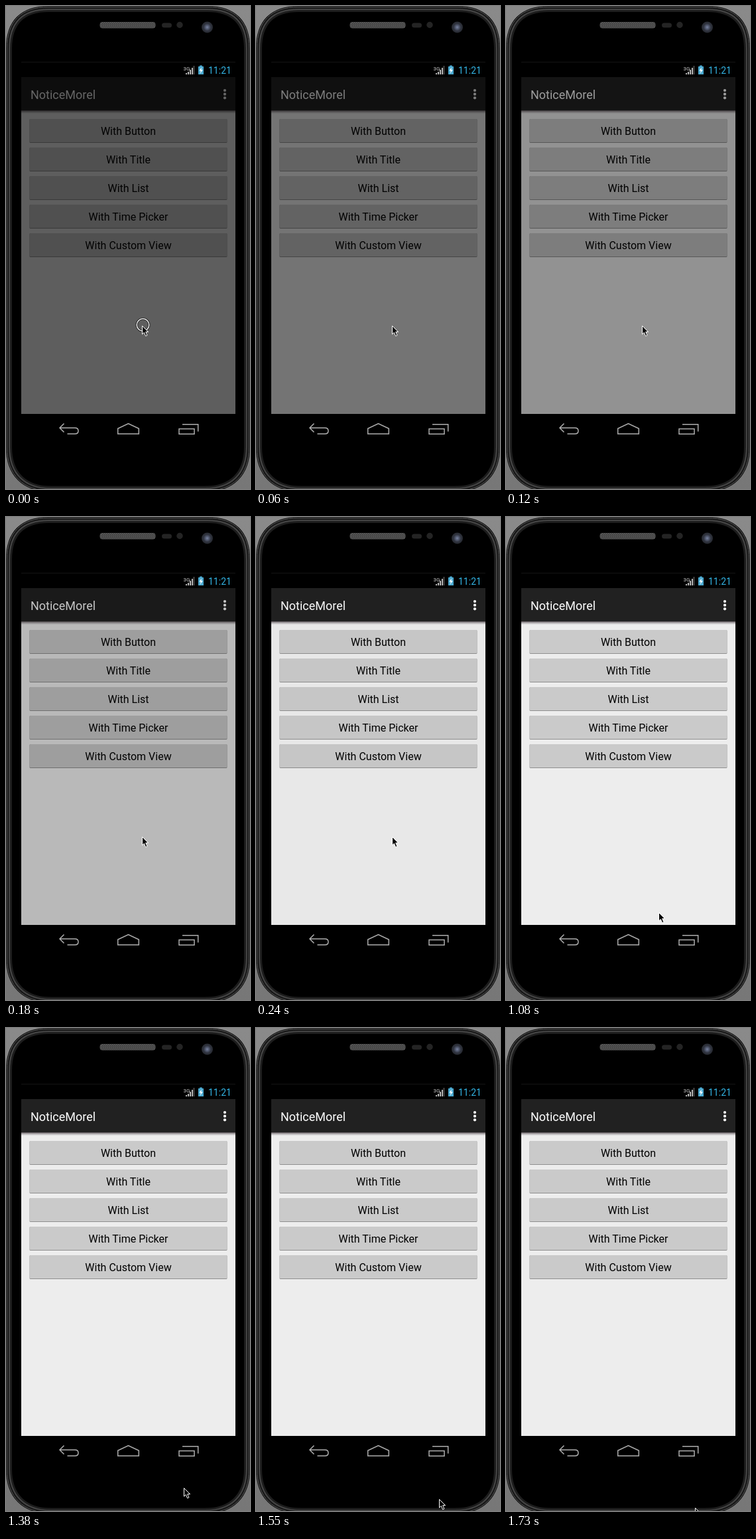
These frames come from a looping animation (368x727 px, 1.79 s). An HTML page:

```html
<!DOCTYPE html>
<html lang="en">
<head>
<meta charset="utf-8">
<title>Phone dialog fade</title>
<style>
html, body { margin: 0; width: 100%; height: 100%; overflow: hidden; background: #838383; }
svg { display: block; width: 368px; height: 727px; font-family: Roboto, sans-serif; }
</style>
</head>
<body>
<svg viewBox="0 0 368 727">
  <defs>
    <linearGradient id="back" x2="0" y2="1">
      <stop offset="0" stop-color="#8a8a8a"/><stop offset="1" stop-color="#777"/>
    </linearGradient>
    <linearGradient id="shade" x2="0" y2="1">
      <stop offset="0" stop-color="#514a4e"/><stop offset=".4" stop-color="#aaa5a8"/><stop offset="1" stop-color="#ededed"/>
    </linearGradient>
    <radialGradient id="lens">
      <stop offset="0" stop-color="#7883a0"/><stop offset=".4" stop-color="#4a5165"/>
      <stop offset=".65" stop-color="#30343f"/><stop offset="1" stop-color="#272a31"/>
    </radialGradient>
    <pattern id="mesh" width="3" height="3" patternUnits="userSpaceOnUse">
      <rect width="3" height="3" fill="#383838"/><path d="M0 0L3 3M3 0L0 3" stroke="#686868" stroke-width=".7"/>
    </pattern>
    <path id="body" d="M1.5 64C1.5 23 23 1.5 64 1.5H304C345 1.5 366.5 23 366.5 64V664C366.5 706 342 730 300 730H68C26 730 1.5 706 1.5 664Z"/>
    <clipPath id="inside"><use href="#body"/></clipPath>
  </defs>

  <rect width="368" height="727" fill="url(#back)"/>
  <use href="#body"/>
  <g fill="none" clip-path="url(#inside)">
    <use href="#body" stroke="#1d1d1d" stroke-width="15"/>
    <use href="#body" stroke="#4c4c4c" stroke-width="9"/>
    <use href="#body" stroke="#222" stroke-width="6"/>
  </g>
  <use href="#body" fill="none" stroke="#0b0b0b" stroke-width="3"/>
  <use href="#body" fill="none" stroke="#646464" stroke-width="1"/>

  <rect x="142" y="24.5" width="83" height="8.5" rx="3" fill="url(#mesh)" stroke="#555"/>
  <rect x="235" y="25.5" width="15" height="7" rx="3.5" fill="#242424"/>
  <circle cx="262" cy="28.5" r="4.7" fill="#242424"/>
  <circle cx="303.5" cy="32" r="8.5" fill="url(#lens)"/>

  <path d="M23 84.5H346" stroke="#141414"/>
  <text x="267.5" y="96.5" font-size="8" fill="#ccc">3G</text>
  <path d="M271 103V101H273V103ZM274 103V99H276V103ZM277 103V96H279V103ZM280 103V93H282V103Z" fill="#bbb"/>
  <path d="M283 103V90H284V103Z" fill="#777"/>
  <path d="M290 91H292V89.5H296V91H298V103H290Z" fill="#4aa9d0"/>
  <path d="M295 92L291.5 97.5H293.7L293 102L296.7 96H294.5Z" fill="#fff"/>
  <text x="305" y="101.5" font-size="14" fill="#33b5e5">11:21</text>

  <rect x="23" y="107" width="323" height="507" fill="#ededed"/>
  <rect x="23" y="107" width="323" height="50" fill="#212121"/>
  <rect x="23" y="157" width="323" height="5" fill="url(#shade)"/>
  <text x="37" y="139.5" font-size="18" fill="#fff">NoticeMorel</text>
  <g fill="#fff">
    <circle cx="330" cy="127" r="2.1"/><circle cx="330" cy="132.7" r="2.1"/><circle cx="330" cy="138.3" r="2.1"/>
  </g>
  <g id="buttons" font-size="16" text-anchor="middle"></g>
  <rect id="dim" x="23" y="107" width="323" height="507"/>

  <g fill="none" stroke="#adadad" stroke-width="1.5">
    <path d="M87.5 628.5L81 635L87.5 641.5M81 635H104Q109 635 109 639.5T104 644H92.5"/>
    <path d="M168.7 644V636L184.5 628.5L200.3 636V644Z"/>
    <path d="M261 636.5H284V644.3H261ZM266 629.7H289.7V640.5"/>
  </g>

  <g id="ring" fill="none">
    <circle cx="206.5" cy="480" r="9.3" stroke="#222" stroke-width="3"/>
    <circle cx="206.5" cy="480" r="9.3" stroke="#fff" stroke-width="1.3"/>
  </g>
  <path id="cursor" d="M.5 .5V13L3.3 10.4L5.6 15.7L7.9 14.7L5.7 9.6H9.6Z" stroke="#fff" stroke-width="1"/>
</svg>
<script>
const LOOP = 1790;
const $ = id => document.getElementById(id);

$("buttons").innerHTML = ["Button", "Title", "List", "Time Picker", "Custom View"].map((name, i) =>
  `<g transform="translate(0 ${i * 43})">
    <rect x="35.5" y="170" width="298" height="36" rx="1.5" fill="#8f8f8f"/>
    <rect x="35.5" y="170" width="298" height="35" rx="1.5" fill="#cacaca"/>
    <text x="184.5" y="194">With ${name}</text>
  </g>`).join("");

// Each step is [time, value] and holds until the next one.
function play(id, prop, steps) {
  const frames = steps.map(([time, value]) => ({ offset: time / LOOP, [prop]: value, easing: "step-end" }));
  frames.push({ offset: 1, [prop]: steps[steps.length - 1][1] });
  $(id).animate(frames, { duration: LOOP, iterations: Infinity });
}

play("dim", "opacity", [[0, .6], [60, .51], [120, .384], [180, .22], [240, .021], [840, 0]]);
play("ring", "opacity", [[0, 1], [60, 0]]);

const path = [
  [206, 485], [207, 499], [211, 528], [220, 563], [230, 595], [241, 622], [250, 645], [257, 662],
  [263, 677], [268, 692], [273, 702], [276, 709], [279, 714], [282, 718], [284, 721], [285, 722]
];
const at = ([x, y]) => `translate(${x}px, ${y}px)`;
play("cursor", "transform", [
  [0, at([205, 481])], [60, at([205, 481])],
  ...path.map((p, i) => [Math.min(840 + i * 60, 1730), at(p)])
]);
</script>
</body>
</html>
```
